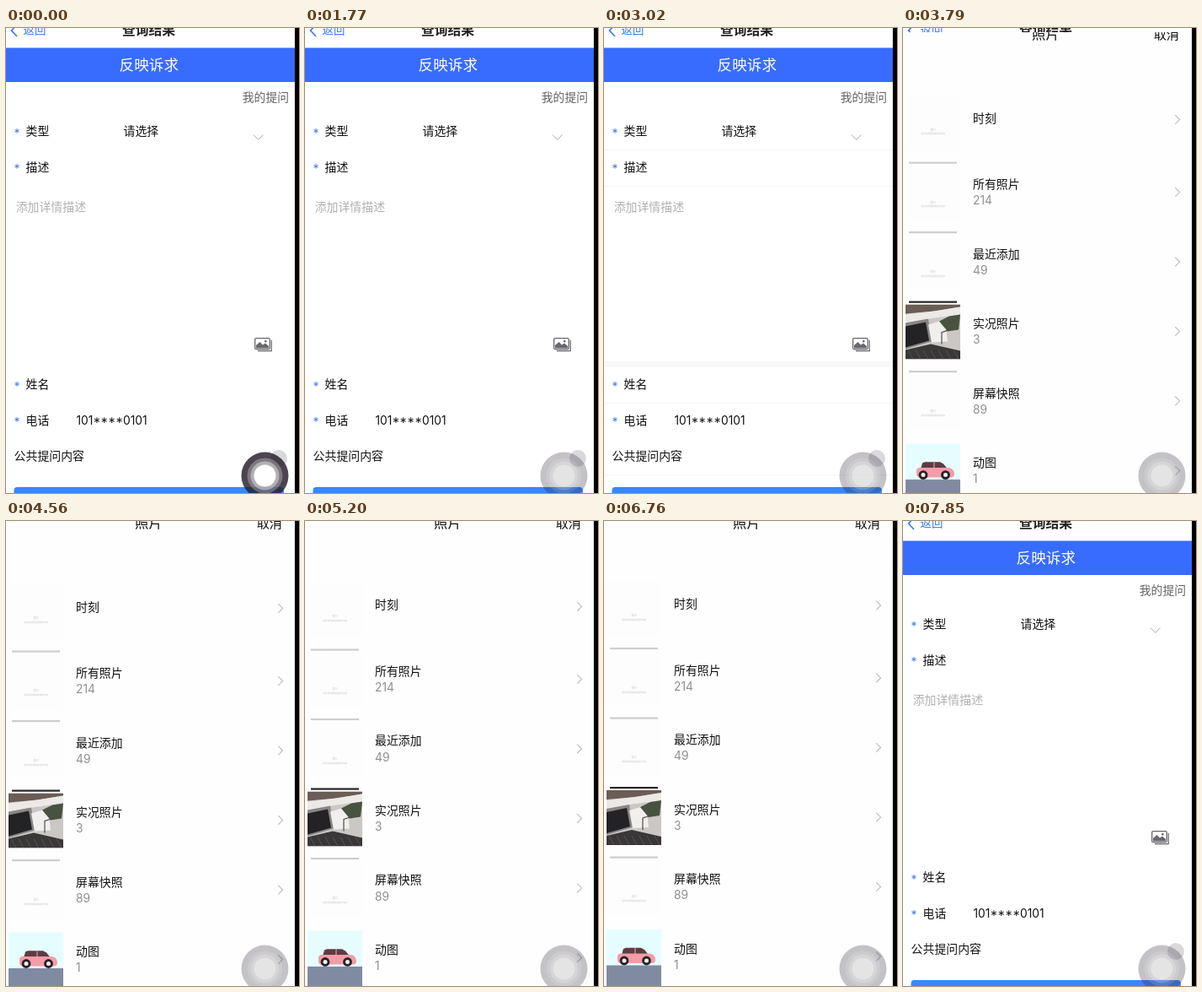
Animation of 348x551 px, one loop 7920 ms. Source, as an HTML page with a canvas:

```html
<!DOCTYPE html>
<html lang="zh-CN">
<head>
<meta charset="utf-8">
<title>反映诉求</title>
<style>
  html, body { margin: 0; width: 100%; height: 100%; overflow: hidden; background: #fff; }
  canvas { display: block; width: 348px; height: 551px; }
</style>
</head>
<body>
<canvas id="stage"></canvas>
<script>
const W = 348, H = 551, PAGE = 343, LOOP = 7920, ROW = 82.5;
const CJK = '"Noto Sans CJK SC", "Noto Sans CJK", sans-serif';
const LATIN = 'Inter, Roboto, sans-serif';
const canvas = document.getElementById('stage');
const ctx = canvas.getContext('2d');
const dpr = window.devicePixelRatio || 1;
canvas.width = W * dpr;
canvas.height = H * dpr;

const ease = p => 1 - Math.pow(1 - p, 3);
const ramp = (t, a, b) => Math.min(1, Math.max(0, (t - a) / (b - a)));
const mix = (a, b, p) => a + (b - a) * p;

function rect(x, y, w, h, color) {
  ctx.fillStyle = color;
  ctx.fillRect(x, y, w, h);
}

function round(x, y, w, h, r, color) {
  ctx.fillStyle = color;
  ctx.beginPath();
  ctx.roundRect(x, y, w, h, r);
  ctx.fill();
}

function disc(x, y, r, color) {
  ctx.fillStyle = color;
  ctx.beginPath();
  ctx.arc(x, y, r, 0, Math.PI * 2);
  ctx.fill();
}

function trace(pts) {
  ctx.beginPath();
  for (let i = 0; i < pts.length; i += 2) ctx.lineTo(pts[i], pts[i + 1]);
}

function poly(pts, color) {
  trace(pts);
  ctx.fillStyle = color;
  ctx.fill();
}

function line(pts, color, width = 1) {
  trace(pts);
  ctx.strokeStyle = color;
  ctx.lineWidth = width;
  ctx.stroke();
}

// cy is the visual middle of the glyphs
function text(s, x, cy, size, color, { font = CJK, weight = 400, align = 'left' } = {}) {
  ctx.font = `${weight} ${size}px ${font}`;
  ctx.textAlign = align;
  ctx.fillStyle = color;
  ctx.fillText(s, x, cy + size * (font === CJK ? 0.325 : 0.355));
}

function pictureIcon(x, y) {
  const c = '#68686d';
  ctx.strokeStyle = c;
  ctx.lineWidth = 1.3;
  ctx.beginPath();
  ctx.roundRect(x + .7, y + .7, 17.6, 13, 1.5);
  ctx.stroke();
  poly([x + 2, y + 12.5, x + 2, y + 9, x + 6.5, y + 5, x + 10, y + 8.5, x + 13, y + 6.5, x + 17, y + 10, x + 17, y + 12.5], c);
  disc(x + 13.3, y + 4.2, 1.3, c);
  line([x + 20.3, y + 3, x + 20.3, y + 15.7, x + 4, y + 15.7], c, 1.2);
}

function drawForm(sep, dim) {
  rect(0, 0, PAGE, H, '#fff');
  line([13, -4, 6.5, 3, 13, 10], '#3478f6', 1.6);
  text('返回', 20.5, 3, 13.4, '#3478f6');
  text('查询结果', 169.5, 3, 15.8, '#222', { weight: 700, align: 'center' });
  // the bar gets a deeper hue under the dimming layer
  rect(0, 23.5, PAGE, 40.5, `rgb(${mix(56, 34, dim)}, ${mix(107, 86, dim)}, 255)`);
  text('反映诉求', 169.8, 44, 17.6, '#fff', { align: 'center' });
  text('我的提问', 336, 82.5, 13.8, '#626266', { align: 'right' });

  if (sep > 0) {
    ctx.globalAlpha = sep;
    for (const y of [144, 187, 444, 529]) rect(0, y, PAGE, 1, '#e9e9ec');
    rect(0, 395, PAGE, 7, '#efeff2');
    ctx.globalAlpha = 1;
  }

  for (const [label, y] of [['类型', 122.5], ['描述', 165], ['姓名', 422.5], ['电话', 465]]) {
    text('*', 9.6, y + 2.4, 14, '#3f7bf0', { font: LATIN });
    text(label, 23.6, y, 13.9, '#111');
  }
  text('请选择', 139.5, 122.5, 13.9, '#111');
  line([294, 126.5, 299.7, 132.5, 305.4, 126.5], '#ababb0');
  text('添加详情描述', 11.7, 212, 13.9, '#b0b0b2');
  pictureIcon(295, 367);
  text('101****0101', 83.5, 465, 13.8, '#111', { font: LATIN });
  text('公共提问内容', 9.6, 507.5, 13.9, '#111');
  disc(324, 510, 10, '#d9d9dc');
  round(9.5, 544, 320.5, 20, 4, '#3a86fb');
}

function drawSheet(p) {
  rect(0, 0, PAGE, H, `rgba(0,0,8,${0.36 * p})`);
  ctx.save();
  ctx.translate(0, mix(72, 0, p));
  round(3, 480, 333.5, 100, 12, '#fefefe');
  text('拍照', 17, 500.5, 13.9, '#111');
  text('照片图库', 17, 541, 13.9, '#111');
  round(296, 493.5, 23, 16.5, 2.5, '#0b66dc');
  poly([301, 494, 303.5, 491, 311.5, 491, 314, 494], '#0b66dc');
  disc(307.5, 501.7, 5.2, '#fff');
  disc(307.5, 501.7, 3.9, '#0b66dc');
  ctx.strokeStyle = '#1c62cf';
  ctx.lineWidth = 1.1;
  ctx.strokeRect(294.8, 530.8, 23, 17);
  ctx.strokeRect(298, 533.5, 23, 17);
  ctx.restore();
}

function deskThumb(y) {
  ctx.save();
  ctx.beginPath();
  ctx.rect(3, y, 65, 65);
  ctx.clip();
  ctx.translate(3, y);
  rect(0, 0, 65, 65, '#cbc7c4');
  poly([0, 0, 65, 0, 65, 3, 34, 8, 0, 11], '#6b5c56');
  poly([0, 12, 34, 8, 65, 3, 65, 12, 28, 17, 0, 22], '#ece9e7');
  poly([0, 22, 27, 17, 31, 44, 0, 53], '#8a8685');
  poly([0, 26, 24, 21, 28, 43, 0, 51], '#232325');
  poly([27, 24, 47, 18, 50, 44, 31, 45], '#f1efee');
  poly([40, 20, 52, 14, 65, 12, 63, 30, 50, 32], '#48533f');
  line([52, 30, 43, 33, 43, 47], '#4a4d43', 1.2);
  poly([0, 54, 30, 47, 65, 55, 65, 65, 0, 65], '#3a3738');
  for (let i = 0; i < 7; i++) line([3 + i * 9, 54, 9 + i * 9, 65], '#5f5a5c', .8);
  ctx.restore();
}

function carThumb(y) {
  rect(3, y, 65, 42.5, '#e6fdff');
  rect(3, y + 42.5, 65, 30, '#808ba2');
  poly([21, y + 30, 23, y + 23, 26, y + 21.8, 44, y + 21.8, 48, y + 24, 53, y + 30], '#5b3d42');
  line([37, y + 22, 37, y + 30], '#f2919d', 1.2);
  round(16, y + 28.5, 45, 11.5, [4, 7, 4, 4], '#f49ca7');
  for (const x of [24, 50.5]) {
    disc(x, y + 37, 5.4, '#2a2226');
    disc(x, y + 37, 2.5, '#f4eeee');
  }
}

function blankThumb(y, dy) {
  rect(3, y, 65, 65, '#fdfdfd');
  text('提问', 35.5, y + dy, 3, '#c6c6c8', { align: 'center' });
  text('请添加详情描述提问内容', 35.5, y + dy + 5, 2.6, '#c2c2c4', { align: 'center' });
}

const albums = [['时刻', ''], ['所有照片', '214'], ['最近添加', '49'], ['实况照片', '3'], ['屏幕快照', '89'], ['动图', '1']];

function drawAlbums(top, shift) {
  ctx.save();
  ctx.beginPath();
  ctx.rect(0, top, PAGE, H);
  ctx.clip();
  ctx.translate(0, top);
  rect(0, 0, PAGE, H, '#fefefe');
  albums.forEach(([name, count], i) => {
    const y = 71.5 + i * ROW + shift;
    if (i === 3) {
      rect(7, y - 4, 57, 2.2, '#262628');
      deskThumb(y);
    } else if (i === 5) {
      carThumb(y);
    } else {
      if (i) rect(7, y - 4, 57, 2.2, '#cdcdcf');
      blankThumb(y, i ? 44 : 40.5);
    }
    text(name, 83, y + (i ? 23 : 27), 13.9, '#111');
    text(count, 83, y + 42, 13.8, '#8f8f93', { font: LATIN });
    const c = y + (i ? 32 : 28.5);
    line([323.3, c - 5.3, 328.6, c, 323.3, c + 5.3], '#bfbfc4', 1.2);
  });
  rect(0, 0, PAGE, 24, '#fefefe');
  text('照片', 169.5, 3, 16.4, '#111', { weight: 500, align: 'center' });
  text('取消', 328, 3.3, 15.2, '#111', { align: 'right' });
  ctx.restore();
}

// lit: 1 right after a touch, 0 at rest
function drawBall(lit) {
  const x = 307.5, y = 530.5;
  disc(x, y, 28, `rgba(40,32,44,${mix(.27, .83, lit)})`);
  disc(x, y, 21, `rgba(255,255,255,${mix(.12, .28, lit)})`);
  disc(x, y, 17, `rgba(255,255,255,${mix(.18, .4, lit)})`);
  disc(x, y, 13, `rgba(255,255,255,${mix(.38, 1, lit)})`);
}

function draw(t) {
  const lit = 1 - ramp(t, 850, 1400);
  const sheet = ease(ramp(t, 1850, 2300)) - ease(ramp(t, 2560, 2920));
  const sep = ramp(t, 1850, 2100) - .55 * ramp(t, 2560, 2920) - .45 * ramp(t, 3310, 3900);
  const album = ease(ramp(t, 3380, 3900)) - ease(ramp(t, 6780, 7260));
  const shift = 3.5 * (1 - ease(ramp(t, 5030, 5700)));

  ctx.setTransform(dpr, 0, 0, dpr, 0, 0);
  rect(0, 0, W, H, '#000');
  drawForm(sep, sheet);
  if (sheet > 0) drawSheet(sheet);
  if (album > 0) drawAlbums(H * (1 - album), shift);
  ctx.save();
  ctx.beginPath();
  ctx.rect(0, 0, PAGE, H);
  ctx.clip();
  drawBall(lit);
  ctx.restore();
}

function tick() {
  draw(performance.now() % LOOP);
  requestAnimationFrame(tick);
}
tick();
</script>
</body>
</html>
```
